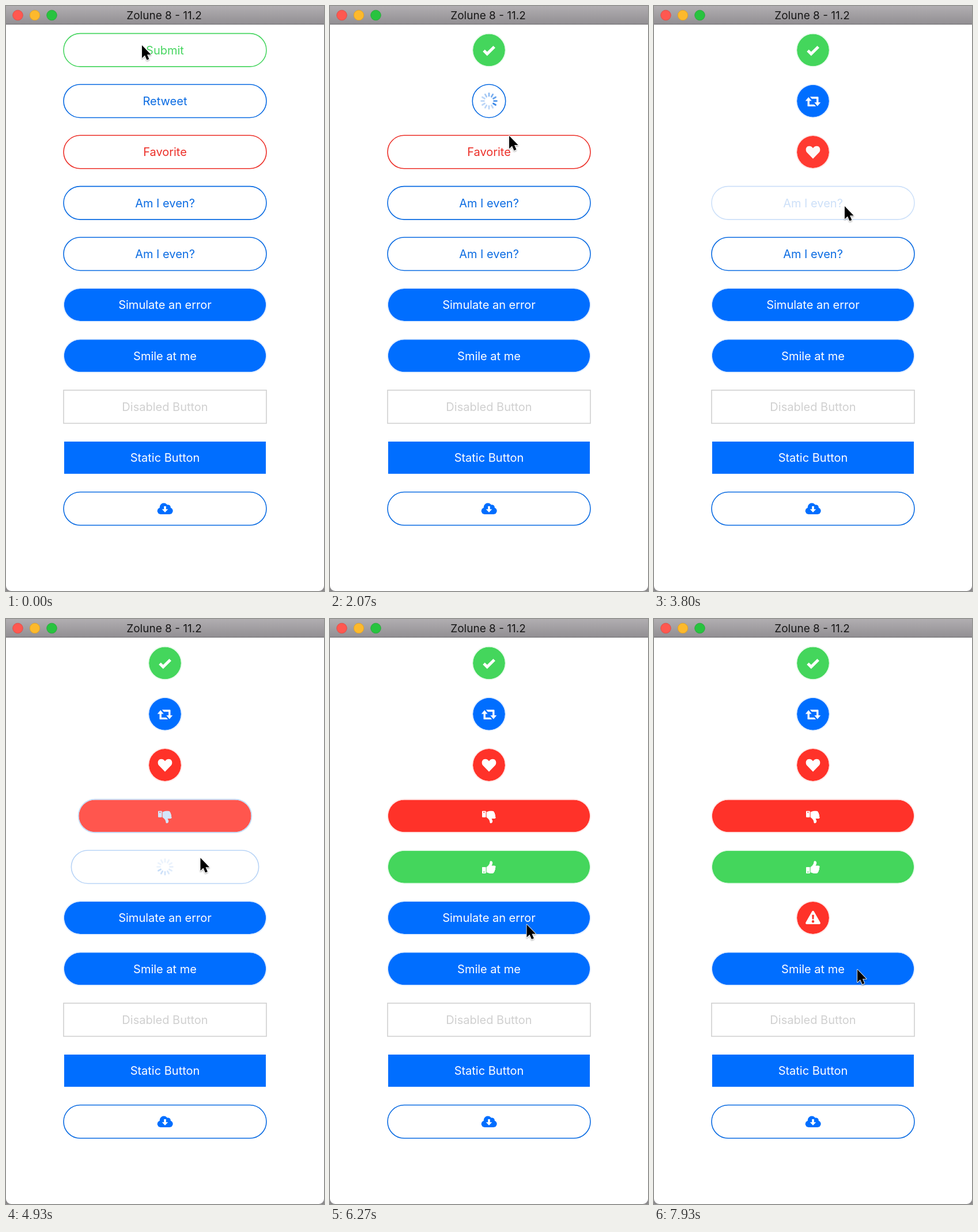
An HTML page for the animation above (8000 ms loop, 552 px wide and 1014 px high).

```html
<!DOCTYPE html>
<html lang="en">
<head>
<meta charset="utf-8">
<title>Animated buttons</title>
<style>
html, body { margin: 0; width: 100%; height: 100%; overflow: hidden; background: #fff; }
svg { display: block; width: 552px; height: 1014px; }
text { font-family: Inter, Roboto, sans-serif; text-anchor: middle; }
</style>
</head>
<body>
<svg id="stage" viewBox="0 0 552 1014" width="552" height="1014">
  <defs>
    <linearGradient id="bar" x2="0" y2="1">
      <stop offset="0" stop-color="#b1aeb1"/>
      <stop offset="1" stop-color="#918e92"/>
    </linearGradient>
    <filter id="shadow" x="-50%" y="-50%" width="200%" height="200%">
      <feDropShadow dx="0" dy="1.5" stdDeviation="1.3" flood-opacity=".35"/>
    </filter>
  </defs>
  <rect width="552" height="1014" fill="#8b898c"/>
  <path d="M0 32H552V1005A9 9 0 0 1 543 1014H9A9 9 0 0 1 0 1005Z" fill="#fff"/>
  <rect width="552" height="32" fill="url(#bar)"/>
  <rect y="31" width="552" height="1.2" fill="#716f72"/>
  <g stroke-width=".8">
    <circle cx="20.5" cy="16" r="8.8" fill="#ff5850" stroke="#dd4740"/>
    <circle cx="50" cy="16" r="8.8" fill="#fdb92c" stroke="#d99e25"/>
    <circle cx="79.5" cy="16" r="8.8" fill="#28c33f" stroke="#23a537"/>
  </g>
  <text x="274.5" y="23.3" font-size="19" fill="#171717">Zolune 8 - 11.2</text>
  <g id="buttons"></g>
  <path id="cursor" d="M0 0V22.3L5 17.6L8.5 25.6L12.4 23.9L9 16.2H15.6Z" fill="#000"
    stroke="#fff" stroke-width="1.6" stroke-linejoin="round" paint-order="stroke" filter="url(#shadow)"/>
</svg>
<script>
const LOOP = 8000, CX = 276, TOP = 76.4, STEP = 88.32, FULL = 352, SIZE = 57.5;
const LOAD = 940, GROW = 200;
const BLUE = '#006eff', INK = '#0a6be2', RED = '#ff3229', GREEN = '#44d65c', WHITE = '#ffffff';

const thumb = `<path d="M-11.2 -.3H-6.2Q-5.4 -.3 -5.4 .5V9.9Q-5.4 10.7 -6.2 10.7H-11.2Q-12 10.7 -12 9.9V.5Q-12 -.3 -11.2 -.3ZM-8.7 7.1a1 1 0 1 0 .01 0Z" fill-rule="evenodd"/>
  <path d="M-4.4 -.4C-2 -2 .1 -4 1 -6.6C1.5 -8.5 1.3 -10.7 3 -10.7C6 -10.7 6.6 -8 6 -6C5.6 -4.5 5 -3.6 4.5 -2.7H9.3C12 -2.7 12.3 .5 10.6 1.4C11.6 2.5 11.1 4.5 10 5C10.5 6.5 9.7 8 8.7 8.3C9 10 7.5 10.7 5.5 10.7H2.2C-1 10.7 -2.5 9 -4.4 9Z"/>`;
const halfTweet = `<path d="M-13.2 -1.2L-7.8 -7.8L-2.4 -1.2ZM-9.5 -2H-6.1V5H2L5.2 8.4H-8.3Q-9.5 8.4 -9.5 7.2Z"/>`;
const icons = {
  check: `<path d="M-9 .8L-3.2 6.5L9.2 -5.6" fill="none" stroke="currentColor" stroke-width="5"/>`,
  retweet: `<g transform="translate(0 1)">${halfTweet}<g transform="rotate(180)">${halfTweet}</g></g>`,
  heart: `<path d="M0 11.6L-10.4 1C-14 -3 -12.4 -10.2 -6.6 -10.2C-3.6 -10.2 -1.3 -8.6 0 -6.6C1.3 -8.6 3.6 -10.2 6.6 -10.2C12.4 -10.2 14 -3 10.4 1Z"/>`,
  up: `<g transform="translate(0 .6)">${thumb}</g>`,
  down: `<g transform="translate(0 2) scale(1 -1)">${thumb}</g>`,
  warn: `<path d="M-1.8 -11Q0 -13.4 1.8 -11L12.6 8Q13.6 10.8 11 11H-11Q-13.6 10.8 -12.6 8ZM-1.8 -5.2L-1.3 2.6H1.3L1.8 -5.2ZM0 4.1a2.2 2.2 0 1 0 .01 0Z" fill-rule="evenodd"/>`,
  cloud: `<circle cx="-7.6" cy="4" r="5.7"/><circle cx="7.8" cy="3.8" r="5.9"/><circle cx="-2" cy="-2.4" r="7.3"/>
    <circle cx="5.2" cy="-2.2" r="4.6"/><path d="M-7.6 0H7.8V9.7H-7.6Z"/>
    <path d="M-1.8 -4.2H1.8V.9H5.3L0 6.5L-5.3 .9H-1.8Z" fill="#fff"/>`
};

// release: moment the press ends; done: final colour and icon
const buttons = [
  { label: 'Submit', fg: '#49d662', done: GREEN, icon: 'check', release: 550, phase: 2 },
  { label: 'Retweet', fg: INK, done: BLUE, icon: 'retweet', release: 1610, phase: 4 },
  { label: 'Favorite', fg: '#ec3029', done: RED, icon: 'heart', release: 2689, phase: 0 },
  { label: 'Am I even?', fg: INK, done: RED, icon: 'down', release: 3850, phase: 7, expand: true },
  { label: 'Am I even?', fg: INK, done: GREEN, icon: 'up', release: 4863, phase: 9, expand: true },
  { label: 'Simulate an error', fg: WHITE, bg: BLUE, done: RED, icon: 'warn', release: 6560, phase: 5 },
  { label: 'Smile at me', fg: WHITE, bg: BLUE },
  { label: 'Disabled Button', fg: '#d0d0d0', square: true },
  { label: 'Static Button', fg: WHITE, bg: BLUE, square: true },
  { fg: INK, iconOnly: 'cloud' }
];

// each stop: arrive, leave, x, y
const stops = [
  [0, 680, 236, 68], [1250, 1680, 305.5, 172.5], [2400, 2830, 315, 262.5], [3480, 3950, 331, 347],
  [4620, 4980, 337.5, 414], [6080, 6680, 341.5, 529.5], [7780, 8000, 353, 607.5]
];

const clamp = v => Math.max(0, Math.min(1, v));
const ease = v => { v = clamp(v); return v < .5 ? 2 * v * v : 1 - 2 * (1 - v) * (1 - v); };
const lerp = (a, b, p) => a + (b - a) * p;
const channels = hex => [1, 3, 5].map(i => parseInt(hex.slice(i, i + 2), 16));
const mix = (a, b, p) => {
  const x = channels(a), y = channels(b);
  return `rgb(${x.map((v, i) => Math.round(lerp(v, y[i], p)))})`;
};
const set = (el, attrs) => { for (const k in attrs) el.setAttribute(k, attrs[k]); };
const add = (parent, tag, attrs = {}, html = '') => {
  const el = document.createElementNS('http://www.w3.org/2000/svg', tag);
  set(el, attrs);
  el.innerHTML = html;
  return parent.appendChild(el);
};

function box(el, w, h, square) {
  set(el, { x: -w / 2, y: -h / 2, width: w, height: h, rx: square ? 0 : h / 2 });
}

const root = document.getElementById('buttons');
const cursor = document.getElementById('cursor');

buttons.forEach((b, i) => {
  b.g = add(root, 'g', { transform: `translate(${CX} ${TOP + STEP * i})` });
  b.fill = add(b.g, 'rect');
  b.edge = add(b.g, 'rect', { fill: 'none', 'stroke-width': 1.6 });
  if (b.label) {
    b.text = add(b.g, 'text', { y: 7.4, 'font-size': 20, fill: b.fg });
    b.text.textContent = b.label;
  }
  if (b.iconOnly) add(b.g, 'g', { fill: BLUE }, icons[b.iconOnly]);
  if (b.icon) {
    b.mark = add(b.g, 'g', { fill: 'currentColor' }, icons[b.icon]);
    b.spin = add(b.g, 'g', { stroke: b.fg, 'stroke-width': 2.8, 'stroke-linecap': 'round' });
    b.bars = Array.from({ length: 12 }, (_, k) =>
      add(b.spin, 'path', { d: 'M0 -8.6V-13.4', transform: `rotate(${k * 30})` }));
  }
  paint(b, FULL, 0);
});

function paint(b, w, p) {
  const bg = b.bg || WHITE, accent = b.done || bg;
  const pale = mix(WHITE, accent, .13);
  box(b.fill, w - 1.6, SIZE - 1.6, b.square);
  box(b.edge, w, SIZE, b.square);
  b.fill.setAttribute('fill', mix(bg, accent, p));
  const solid = b.bg ? mix(WHITE, bg, b.square ? 0 : .13) : b.fg;
  b.edge.setAttribute('stroke', p >= 1 ? pale : b.bg ? solid : mix(b.fg, WHITE, p * .9));
}

function drawButton(b, t) {
  const since = t - b.release, ready = since - LOAD;
  const p = ease(ready / GROW);
  const shrink = ease((since - 35) / 155);
  const open = b.expand ? p : 0;
  paint(b, lerp(FULL, SIZE, shrink * (1 - open)), p);

  const fade = since < 0 ? lerp(1, .2, ease((since + 200) / 140)) : lerp(.2, 1, ease(since / 300));
  b.g.setAttribute('opacity', fade);

  const loading = since >= 25 && ready < 0;
  b.text.setAttribute('visibility', since < 25 ? 'visible' : 'hidden');
  b.spin.setAttribute('visibility', loading ? 'visible' : 'hidden');
  b.mark.setAttribute('visibility', ready >= 0 ? 'visible' : 'hidden');
  b.mark.setAttribute('color', mix(b.fg, WHITE, p));
  if (loading) {
    const head = Math.floor(t * 12 / 1000) + b.phase;
    b.bars.forEach((bar, k) => {
      const age = ((head - k) % 12 + 12) % 12;
      bar.setAttribute('opacity', Math.max(.27, .8 - age * .09));
    });
  }
}

function drawCursor(t) {
  let i = stops.length - 1;
  while (t < stops[i][0]) i--;
  const a = stops[i], b = stops[i + 1] || a;
  const p = b === a ? 0 : ease((t - a[1]) / (b[0] - a[1]));
  cursor.setAttribute('transform', `translate(${lerp(a[2], b[2], p)} ${lerp(a[3], b[3], p)})`);
}

function draw(now) {
  const t = now % LOOP;
  for (const b of buttons) if (b.icon) drawButton(b, t);
  drawCursor(t);
}

const start = performance.now();
function tick() {
  draw(performance.now() - start);
  requestAnimationFrame(tick);
}
tick();
</script>
</body>
</html>
```
